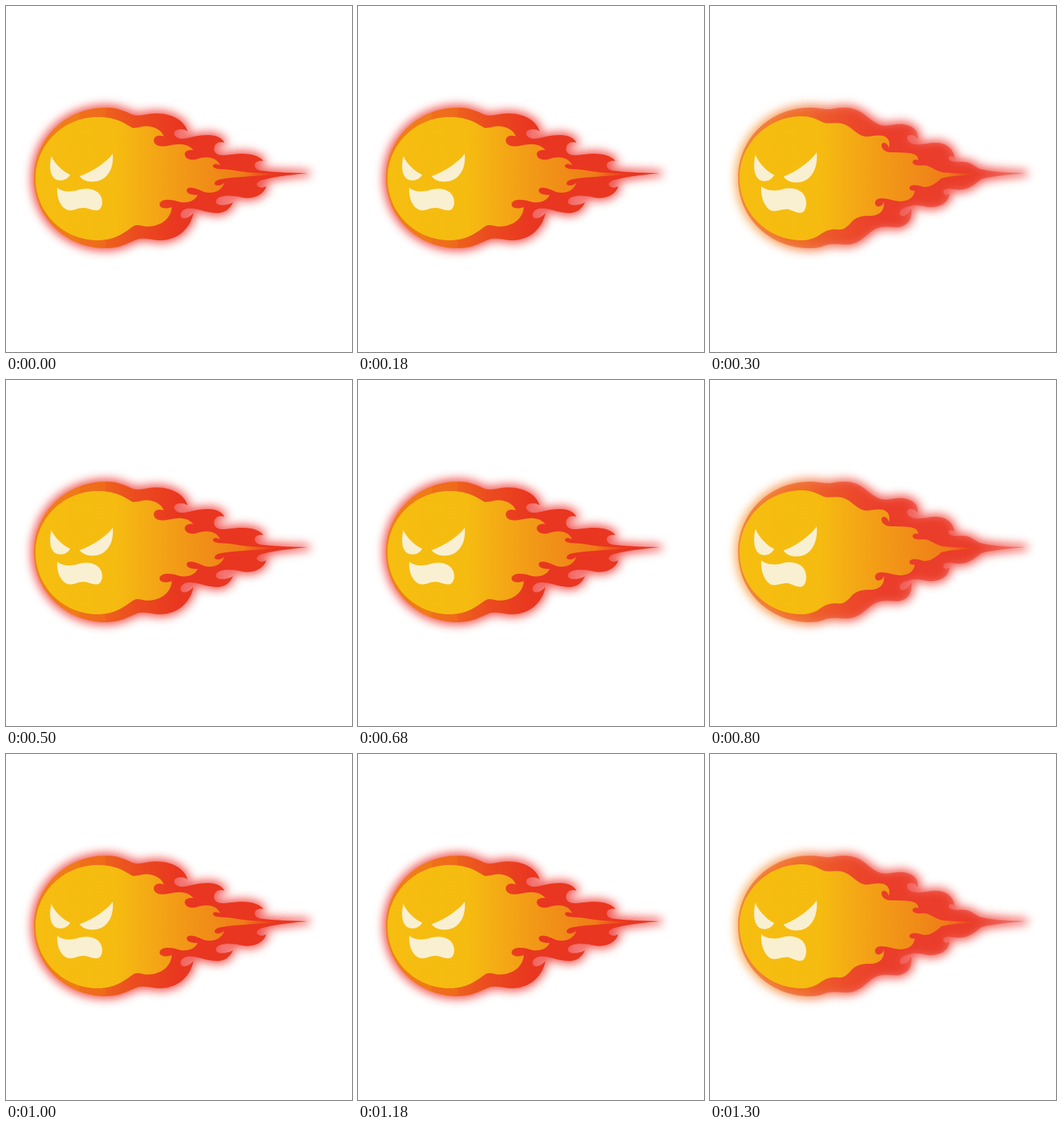
Recreate the animation shown at these times as an HTML page. Size 480 by 480 pixels, loop 1500 ms.

```html
<!DOCTYPE html>
<html lang="en">
<head>
<meta charset="utf-8">
<title>Angry fireball</title>
<style>
  html, body { margin: 0; width: 100%; height: 100%; overflow: hidden; background: #fff; }
  svg { display: block; width: 100vw; height: 100vh; }
  .glow { stroke-width: 8; stroke-linejoin: round; filter: url(#blur); }
</style>
</head>
<body>
<svg viewBox="0 0 480 480">
  <defs>
    <linearGradient id="core" gradientUnits="userSpaceOnUse" x1="40" x2="420" y1="0" y2="0">
      <stop offset="0" stop-color="#f6be10"/>
      <stop offset=".3" stop-color="#f5bb10"/>
      <stop offset=".42" stop-color="#f4a915"/>
      <stop offset=".55" stop-color="#f29717"/>
      <stop offset=".68" stop-color="#f08718"/>
      <stop offset=".76" stop-color="#f07c18"/>
      <stop offset=".87" stop-color="#e93a20"/>
      <stop offset="1" stop-color="#e93820"/>
    </linearGradient>
    <linearGradient id="rim" gradientUnits="userSpaceOnUse" x1="40" x2="240" y1="0" y2="0">
      <stop offset="0" stop-color="#f18016"/>
      <stop offset=".31" stop-color="#f07a18"/>
      <stop offset=".31" stop-color="#ef701a"/>
      <stop offset=".49" stop-color="#ee6a1a"/>
      <stop offset=".49" stop-color="#ed611c"/>
      <stop offset=".7" stop-color="#eb4c1f"/>
      <stop offset="1" stop-color="#e93620"/>
    </linearGradient>
    <linearGradient id="halo" gradientUnits="userSpaceOnUse" x1="40" x2="210" y1="0" y2="0">
      <stop offset="0" stop-color="#f8a23c"/>
      <stop offset=".5" stop-color="#f28040"/>
      <stop offset="1" stop-color="#ee4038"/>
    </linearGradient>
    <filter id="blur" filterUnits="userSpaceOnUse" x="0" y="100" width="480" height="280" color-interpolation-filters="sRGB">
      <feGaussianBlur stdDeviation="6.5"/>
    </filter>

    <path id="outerA" d="M139 141C155 141 165 146 176 151C186 154 195 149 208 149C232 149 248 160 252 174
      C247 170 238 170 234 174C231 180 238 185 247 184C258 182 268 179 280 179C292 179 300 183 303 190
      C297 187 290 190 289 196C287 202 292 207 300 207C309 207 317 205 328 205C342 205 353 209 357 215
      C350 214 345 217 345 221C345 226 351 229 359 229C376 231 395 231 418 232C398 234 375 236 357 241
      C349 243 346 247 349 250C353 253 358 252 361 250C358 262 343 268 330 266C318 263 305 262 297 265
      C289 268 290 275 296 276C303 277 311 275 315 272C310 284 300 288 290 287C275 286 262 279 251 281
      C243 283 240 289 244 294C249 296 255 293 260 287C257 306 240 325 214 325C203 325 195 321 184 323
      C172 327 160 336 139 336C82 336 39 293 39 239C39 184 83 141 139 141Z"/>
    <path id="innerA" d="M127 154C150 154 163 161 175 169C182 170 190 166 198 167C208 168 216 173 219 181
      C211 178 205 181 205 187C206 194 214 196 224 194C236 191 252 189 260 200C253 199 248 201 248 206
      C249 212 255 214 263 213C275 208 292 208 297 221C291 218 287 219 287 222C288 227 298 226 310 227
      C330 231 355 232 380 233C350 236 315 237 300 240C291 241 288 245 290 248C294 250 299 249 303 245
      C299 257 288 261 275 258C266 254 257 250 252 253C248 257 253 263 266 262C262 271 250 275 238 271
      C226 267 214 268 213 275C213 281 222 282 230 279C229 295 215 306 195 306C187 305 182 302 176 306
      C162 316 150 325 127 325C80 325 41 287 41 240C41 192 80 154 127 154Z"/>
    <path id="outerB" d="M139 141C150 141 158 144 168 143C180 141 190 140 200 143C215 147 222 160 236 165
      C248 168 256 163 268 164C283 166 290 174 288 185C284 178 277 177 274 181C272 186 277 191 285 192
      C297 193 305 189 318 190C332 192 339 202 339 211C336 207 331 208 331 211C331 216 340 217 348 216
      C360 215 365 221 374 226C390 230 410 231 437 232C415 234 392 236 377 240C368 246 360 255 346 255
      C338 255 328 251 324 256C322 261 328 264 332 260C332 272 320 279 306 279
      C298 279 288 274 276 278C266 280 262 285 264 290C267 294 275 290 279 281C282 297 272 307 258 307
      C245 306 235 305 225 312C213 321 205 331 190 331C178 331 170 329 160 332C152 335 146 336 139 336
      C82 336 39 293 39 239C39 184 83 141 139 141Z"/>
    <path id="innerB" d="M127 153C141 153 150 158 158 162C166 164 174 161 183 163C197 167 202 178 214 181
      C222 182 230 178 240 180C249 183 250 190 248 197C246 189 240 188 238 192C237 198 243 203 251 203
      C260 203 268 203 276 204C285 205 289 208 289 214C286 212 281 213 281 217C282 221 289 222 296 221
      C306 221 312 229 324 231C340 232 355 233 370 233.5C350 235 332 236 321 239C313 246 305 252 296 251
      C290 249 283 247 278 250C275 253 277 257 284 256C283 266 275 271 263 271C253 270 243 266 235 267
      C228 268 227 276 232 278C237 279 241 275 241 271C243 283 236 291 222 291C212 291 203 292 196 300
      C188 309 184 311 176 310C166 309 158 313 150 319C142 323 136 325 127 325C80 325 41 287 41 239
      C41 191 80 153 127 153Z"/>
    <path id="eyes" d="M63 208C66 216 77 229 89 234C85 242 75 244 68 240C60 234 60 220 63 208Z
      M148 205C140 216 120 230 102 236C107 243 117 245 127 243C143 239 150 222 148 205Z"/>
    <clipPath id="body"><use href="#outerB"/></clipPath>
  </defs>

  <g id="sharp">
    <use href="#outerA" class="glow" fill="#ee3a35" stroke="#ee3a35" opacity=".85"/>
    <use href="#outerA" fill="url(#rim)"/>
    <use href="#innerA" fill="url(#core)"/>
    <g fill="#f9f0d2">
      <use href="#eyes"/>
      <path d="M71 252C78 258 88 258 98 256C109 252 120 253 128 259C135 266 135 277 130 282
        C124 286 116 281 109 280C100 279 94 285 85 283C75 279 70 265 71 252Z"/>
    </g>
  </g>

  <g id="soft">
    <use href="#outerB" class="glow" fill="url(#halo)" stroke="url(#halo)" opacity=".85"/>
    <use href="#outerB" fill="#ec4a3c" opacity=".45"/>
    <g clip-path="url(#body)">
      <use href="#outerB" fill="url(#rim)" filter="url(#blur)" opacity=".75"/>
    </g>
    <use href="#innerB" fill="url(#core)"/>
    <g fill="#f9f0d2">
      <use href="#eyes" transform="translate(0 -18.4) scale(1 1.08)"/>
      <path d="M71 250C78 256 88 257 98 255C109 251 120 252 128 259C135 266 135 279 130 285
        C124 290 116 284 109 282C100 281 94 286 85 284C75 279 70 264 71 250Z"/>
    </g>
  </g>
</svg>
<script>
  const LOOP = 500, SWITCH = 300 / LOOP;

  // Each pose holds, then gives way in a hard cut.
  function hold(id, first, second) {
    document.getElementById(id).animate([
      { visibility: first, offset: 0, easing: 'steps(1, end)' },
      { visibility: second, offset: SWITCH, easing: 'steps(1, end)' },
      { visibility: second, offset: 1 }
    ], { duration: LOOP, iterations: Infinity });
  }

  hold('sharp', 'visible', 'hidden');
  hold('soft', 'hidden', 'visible');
</script>
</body>
</html>
```
